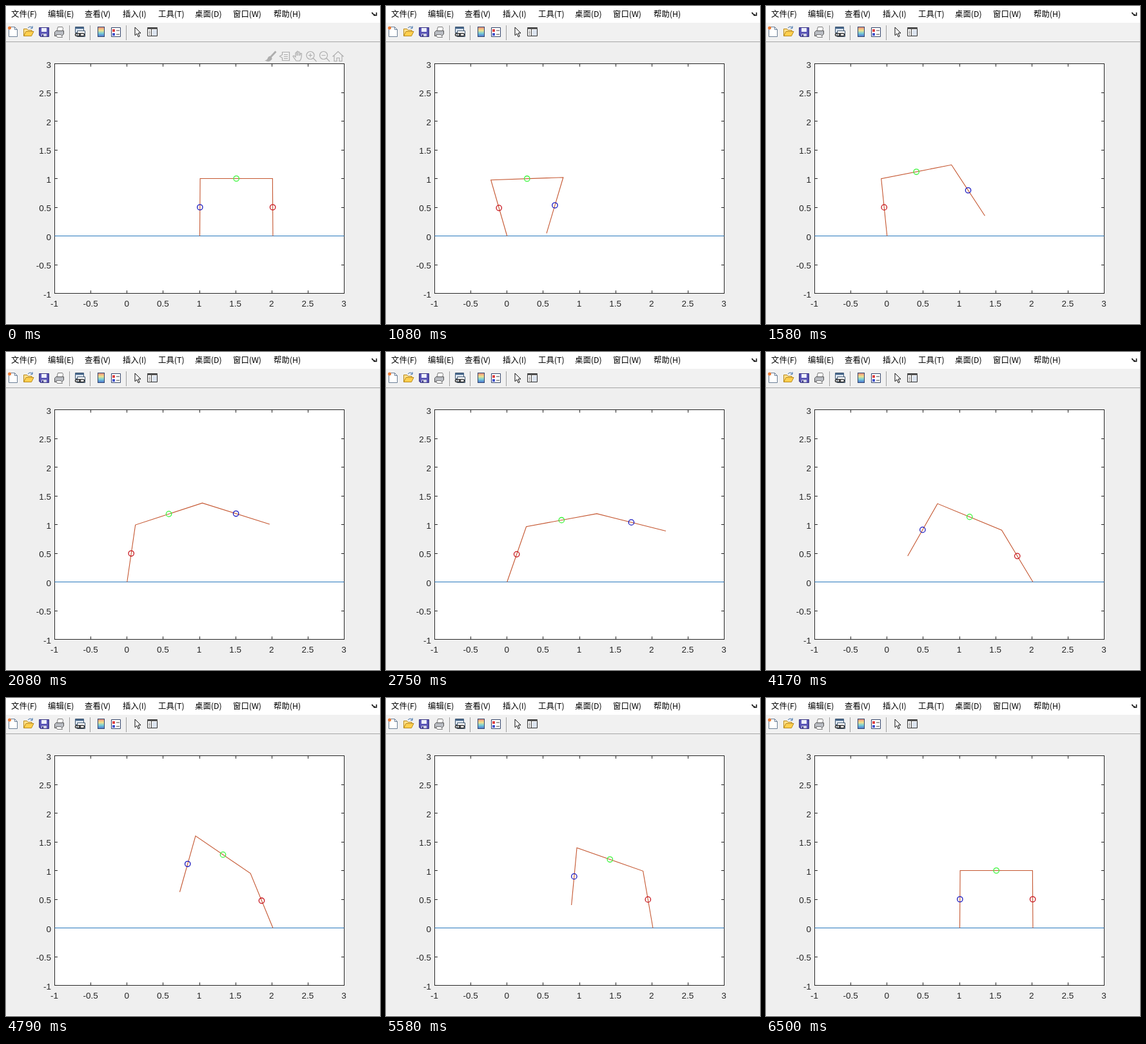
These frames come from a looping animation (580x493 px, 6.54 s). An HTML page:

```html
<!DOCTYPE html>
<html lang="zh">
<head>
<meta charset="utf-8">
<title>三连杆步行</title>
<style>
html, body { margin: 0; width: 100%; height: 100%; overflow: hidden; background: #efefef; }
svg { display: block; }
.menu { font: 12.4px "Noto Sans CJK SC", "Noto Sans CJK", sans-serif; fill: #000; }
.label { font: 13.5px "Liberation Sans", Arial, sans-serif; fill: #262626; }
</style>
</head>
<body>
<svg width="580" height="493" viewBox="0 0 580 493" fill="none">
  <rect width="580" height="493" fill="#efefef"/>
  <rect width="580" height="26" fill="#fff"/>
  <rect y="26" width="580" height="29" fill="#f1f1f1"/>
  <path d="M0 55.5H580" stroke="#a6a6a6"/>
  <path d="M0 492.5H580" stroke="#fff"/>
  <path d="M98.500 30V53M130.500 30V53M186.500 30V53" stroke="#a0a0a0"/>
  <g id="menu" class="menu"></g>
  <path d="M567.500 10q1 3 5 4M574.500 10v4.500h-4.500" stroke="#111" stroke-width="1.600"/>

  <!-- figure toolbar -->
  <g stroke-width="1" transform="translate(0 -1)">
    <path d="M4.500 33.500h9l4 4v11h-13z" fill="#fff" stroke="#6b7f96"/>
    <path d="M13.500 33.500v4h4" stroke="#6b7f96"/>
    <circle cx="5.500" cy="35" r="2.500" fill="#ee7d35"/>
    <path d="M27.500 47.500v-11h5l1.500 2h6v3" fill="#ffe08a" stroke="#b98a1d"/>
    <path d="M27.500 47.500l3.500-7h12l-3.500 7z" fill="#ffd04f" stroke="#b98a1d"/>
    <path d="M34 35q4-4 7 0m0-3v3.500h-3" stroke="#3c6ea8"/>
    <path d="M51.500 34.500h15v14h-13l-2-2z" fill="#5a55b5" stroke="#34307f"/>
    <path d="M55 35h8v6h-8z" fill="#eef0ff"/>
    <path d="M55 44h8v4h-8z" fill="#d2d3e6"/>
    <path d="M56 45h2v3h-2z" fill="#34307f"/>
    <path d="M78.500 41.500l2-8h7l1 2-1 6" fill="#fff" stroke="#777"/>
    <path d="M75.500 41.500l2-2h12v5l-3 3h-11z" fill="#b9bcc2" stroke="#555"/>
    <path d="M77.500 45.500h8l2 4h-8z" fill="#fff" stroke="#777"/>
    <path d="M107.500 33.500h13v9h-13z" fill="#e6eef7" stroke="#38506b"/>
    <path d="M107 34h14v2.500h-14z" fill="#49698d"/>
    <path d="M110.500 39.500h12v9h-12z" fill="#fff" stroke="#38506b"/>
    <rect x="107.500" y="43.500" width="8" height="4" rx="2" stroke="#333" stroke-width="1.500"/>
    <rect x="113.500" y="43.500" width="8" height="4" rx="2" stroke="#333" stroke-width="1.500"/>
    <linearGradient id="bar" x2="0" y2="1">
      <stop stop-color="#e9857b"/><stop offset=".35" stop-color="#f3e28a"/>
      <stop offset=".65" stop-color="#77cfd8"/><stop offset="1" stop-color="#4f70d0"/>
    </linearGradient>
    <rect x="142.500" y="33.500" width="10" height="15" fill="url(#bar)" stroke="#33456b"/>
    <path d="M163.500 34.500h14v14h-14z" fill="#fff" stroke="#33456b"/>
    <path d="M165 37h4v4h-4z" fill="#d44"/>
    <path d="M165 43h4v4h-4z" fill="#45c"/>
    <path d="M171 39h5M171 45h5" stroke="#444"/>
    <path d="M200 34v12.500l3-2.700 2.200 5 2-.9-2.200-4.900h4z" fill="#fff" stroke="#111"/>
    <path d="M219.500 34.500h15v13h-15z" fill="#fff" stroke="#333"/>
    <path d="M219 35h16v2h-16z" fill="#555"/>
    <path d="M225.500 37v10" stroke="#333"/>
    <path d="M221 40h3M221 42.500h3M221 45h3" stroke="#777"/>
    <path d="M227 38h7v9h-7z" fill="#dbe3ee"/>
  </g>

  <rect x="75.500" y="89.500" width="449" height="356" fill="#fff" stroke="#262626"/>
  <path id="ticks" stroke="#262626"/>
  <g id="labels" class="label"></g>
  <path d="M75.500 356.500H524.500" stroke="#2878bd"/>

  <!-- axes toolbar -->
  <g id="tools" stroke="#adadad" stroke-width="1.200">
    <path d="M418.500 70.500l-7.500 8" stroke-width="2.800"/>
    <path d="M411 78q-4 0-5 4-1 2-3 2.500 6 2.500 9-2.500z" fill="#adadad"/>
    <path d="M428.500 71.500h11v13h-11v-4l-4-2.500 4-2.500zM431 75.500h6M431 78.500h6M431 81.500h6"/>
    <path d="M450 85l-5-7q1-2 4 1v-6q1-2 2 0v4-6q1-2 2 0v6-5q1-2 2.500 0v5l1-3q1.500-1.500 2 0 0 8-3 11z"/>
    <circle cx="472" cy="76.500" r="6"/>
    <path d="M476.500 81l5 5M469 76.500h6M472 73.500v6"/>
    <circle cx="492.500" cy="76.500" r="6"/>
    <path d="M497 81l5 5M489.500 76.500h6"/>
    <path d="M506.500 78.500l8.500-8 8.500 8M509 77v8.500h4v-5h4v5h4V77"/>
  </g>

  <path id="links" stroke="#c4552f" stroke-width="1.100"/>
  <g id="marks" stroke-width="1.300">
    <circle r="4.200" stroke="#c8141e"/>
    <circle r="4.200" stroke="#3cf53c"/>
    <circle r="4.200" stroke="#1818c0"/>
  </g>
</svg>
<script>
const $ = id => document.getElementById(id);
const X = x => 187.75 + 112.25 * x;
const Y = y => 356.5 - 89 * y;
const LOOP = 6540, FRAME = 1000 / 24;

const menu = [[8, '文件(F)'], [65, '编辑(E)'], [122, '查看(V)'], [181, '插入(I)'],
  [236, '工具(T)'], [293, '桌面(D)'], [352, '窗口(W)'], [415, '帮助(H)']];
$('menu').innerHTML = menu.map(([x, s]) => `<text x="${x}" y="17">${s}</text>`).join('');

let ticks = '', labels = '';
for (let v = -1; v <= 3; v += 0.5) {
  const x = Math.floor(X(v)) + 0.5, y = Math.floor(Y(v)) + 0.5;
  ticks += `M${x} 445v-4M${x} 90v4M76 ${y}h4M524 ${y}h-4`;
  labels += `<text x="${X(v) - 0.5}" y="465.5" text-anchor="middle">${v}</text>` +
    `<text x="70" y="${Y(v) + 6}" text-anchor="end">${v}</text>`;
}
$('ticks').setAttribute('d', ticks);
$('labels').innerHTML = labels;

// Each step: standing foot, then [time, angles of the three links from that foot]
const steps = [
  { foot: 0, keys: [[42, 90, 0, -90], [1083, 102.9, 2.6, -103.3], [2083, 83.4, 22.4, -21.6],
    [2750, 74.6, 13, -17.6], [3270, 59.5, 0, -59.5]] },
  { foot: 2.015, keys: [[3270, 120.5, 180, 239.5], [3625, 120, 169.7, 238.7],
    [4792, 108.1, 139.3, 257.4], [6500, 90.3, 180, 269.7]] }
];

// Slope at key i, at rest at both ends
function slope(keys, i, j) {
  if (i === 0 || i === keys.length - 1) return 0;
  const [a, b, c] = keys.slice(i - 1, i + 2);
  const h0 = b[0] - a[0], h1 = c[0] - b[0];
  return ((b[j] - a[j]) / h0 * h1 + (c[j] - b[j]) / h1 * h0) / (h0 + h1);
}

function angle(keys, t, j) {
  let i = 0;
  while (i < keys.length - 2 && t > keys[i + 1][0]) i++;
  const a = keys[i], b = keys[i + 1], h = b[0] - a[0];
  const u = Math.min(1, Math.max(0, (t - a[0]) / h)), v = 1 - u;
  return a[j] * v * v * (1 + 2 * u) + b[j] * u * u * (3 - 2 * u) +
    h * u * v * (slope(keys, i, j) * v - slope(keys, i + 1, j) * u);
}

function draw(now) {
  const frame = Math.floor((now % LOOP + 5) / FRAME) % 157;
  const t = frame ? frame * FRAME : 6500;
  const { foot, keys } = steps[t < 3270 ? 0 : 1];
  let x = foot, y = 0, path = `M${X(x)} ${Y(y)}`;
  [...$('marks').children].forEach((mark, i) => {
    const a = angle(keys, t, i + 1) * Math.PI / 180;
    const dx = Math.cos(a), dy = Math.sin(a);
    mark.setAttribute('cx', X(x + dx / 2));
    mark.setAttribute('cy', Y(y + dy / 2));
    x += dx;
    y += dy;
    path += `L${X(x)} ${Y(y)}`;
  });
  $('links').setAttribute('d', path);
  $('tools').style.display = frame ? 'none' : '';
}

const start = performance.now();
(function tick() {
  draw(performance.now() - start);
  requestAnimationFrame(tick);
})();
</script>
</body>
</html>
```
